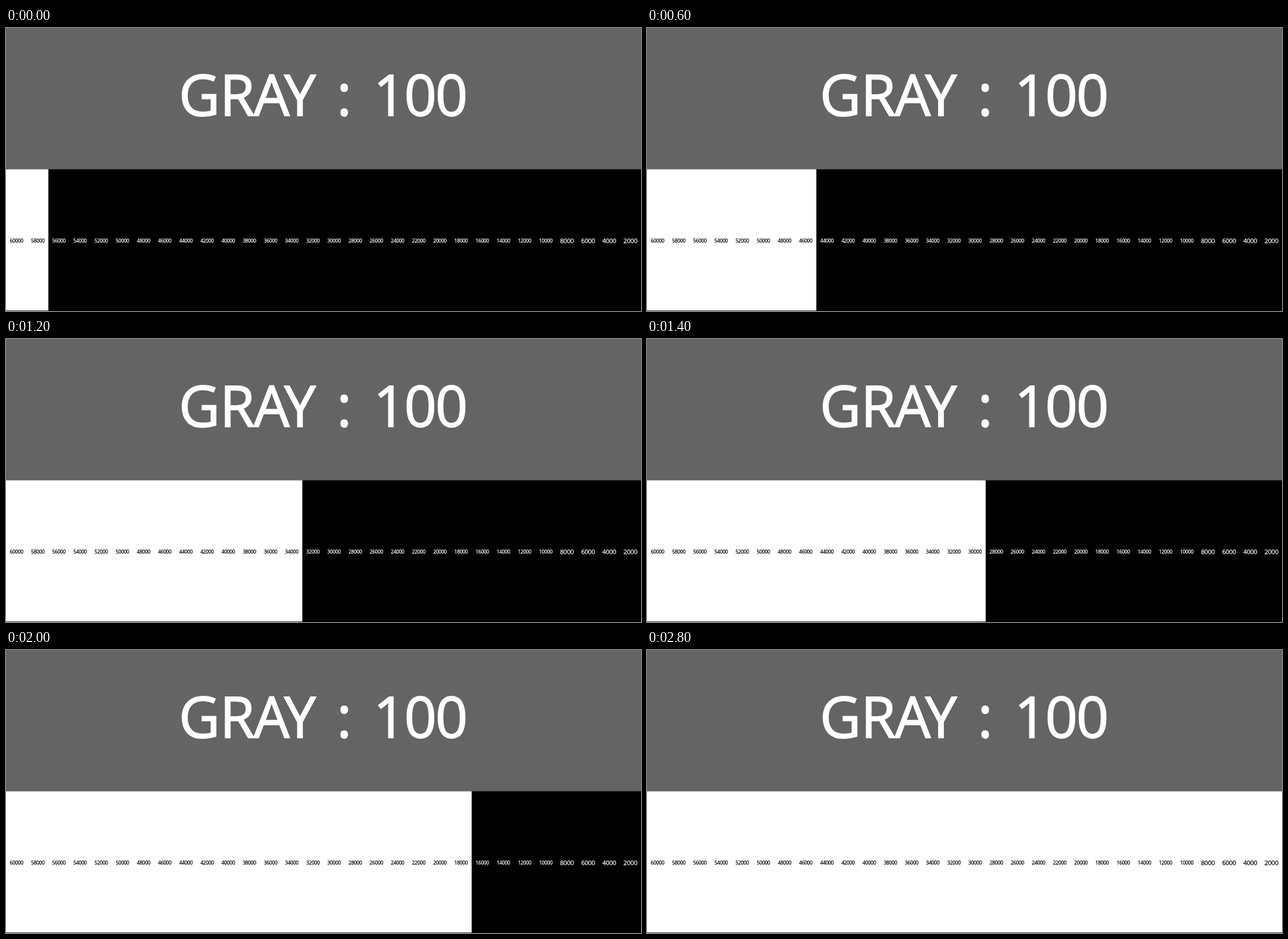
An HTML page for the animation above (3000 ms loop, 1121 by 500 pixels).

```html
<!DOCTYPE html>
<html lang="en">
<head>
<meta charset="utf-8">
<title>Gray bars</title>
<style>
  html, body { margin: 0; width: 100%; height: 100%; overflow: hidden; background: #000; }
  svg { display: block; }
  text { font-family: "Open Sans", "Noto Sans", sans-serif; text-anchor: middle; fill: currentColor; stroke: currentColor; }
  .title { font-size: 100px; color: #fff; stroke-width: 1.8px; }
  .label { font-size: 8.8px; letter-spacing: -.3px; stroke-width: .25px; }
  .label.short { font-size: 11.2px; }
</style>
</head>
<body>
<svg width="1121" height="500" viewBox="0 0 1121 500">
  <rect width="1121" height="249.6" fill="#646464"/>
  <text class="title" y="154.5" x="341.5 408.5 469 519 597 677 731.5 786.5">GRAY:100</text>
  <rect id="bar" y="249.6" height="249.6" fill="#fff"/>
  <g id="labels"></g>
</svg>
<script>
  const WIDTH = 1121, CELLS = 30, STEP = 200, LOOP = 3000;
  const cell = WIDTH / CELLS;
  const bar = document.getElementById("bar");
  const group = document.getElementById("labels");

  const labels = Array.from({ length: CELLS }, (_, i) => {
    const value = (CELLS - i) * 2000;
    const short = value < 10000;
    const label = document.createElementNS(group.namespaceURI, "text");
    label.setAttribute("class", short ? "label short" : "label");
    label.setAttribute("x", (i + .5) * cell);
    label.setAttribute("y", short ? 380 : 379);
    label.textContent = value;
    return group.appendChild(label);
  });

  // Two more cells light up at every step.
  function draw(now) {
    const lit = 2 * (Math.floor(now % LOOP / STEP) + 1);
    bar.setAttribute("width", lit * cell);
    labels.forEach((label, i) => label.style.color = i < lit ? "#000" : "#fff");
  }

  const start = performance.now();
  function tick() {
    draw(performance.now() - start);
    requestAnimationFrame(tick);
  }
  tick();
</script>
</body>
</html>
```
